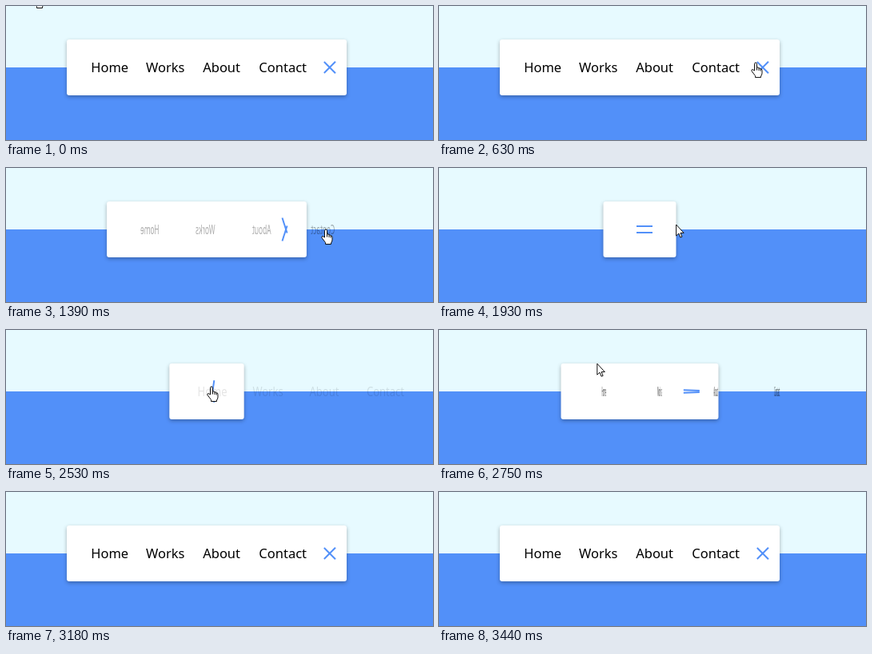
Animation of 534x168 px, one loop 3680 ms. Source, as an HTML page with a canvas:

```html
<!DOCTYPE html>
<html lang="en">
<head>
<meta charset="utf-8">
<title>Animated navigation</title>
<style>
html, body { margin: 0; width: 100%; height: 100%; overflow: hidden; }
canvas { display: block; }
</style>
</head>
<body>
<canvas id="stage" width="534" height="168"></canvas>
<script>
const ctx = document.getElementById('stage').getContext('2d');
const LOOP = 3680, MID = 251, CENTER_Y = 77, CLOSED = 91, OPEN = 350;
const BLUE = '#5290f9';
const items = [['Home', 53.7], ['Works', 123.2], ['About', 193.6], ['Contact', 270.2]];

// time, x, y of the pointer's hot spot
const pointerPath = [
  [0, 39, -16], [30, 39, -16], [460, 396, 71], [630, 396, 71], [750, 400, 77],
  [1730, 400, 77], [1930, 297, 71], [2060, 187, 72], [2190, 257, 71],
  [2600, 257, 71], [2950, 79, -15], [3010, 52, -14.5], [3100, 36, -34], [LOOP, 36, -34]
];
const handTimes = [[0, 30], [400, 1735], [2130, 2640]];
const hand = new Path2D('M-1.5 10V1.5Q-1.5 0 0 0T1.5 1.5V6Q3 5.2 4 7Q5.6 6 6.2 8Q8 7.4 8 9.5V13Q8 15 6.5 17V18.5H-.5V16.5L-5 10.5Q-5.5 8.5-3.8 8.5Z');
const fingers = new Path2D('M1.5 6V9.5M4 7V10M6.2 8V10.5');
const arrow = new Path2D('M.5 0V14L3.7 11 5.7 16 7.8 15.2 5.8 10.4H10Z');

const clamp = v => Math.min(1, Math.max(0, v));
const mix = (a, b, k) => a + (b - a) * k;
const ramp = (t, start, length) => clamp((t - start) / length);

// CSS "ease": cubic-bezier(.25, .1, .25, 1)
function ease(x) {
  let lo = 0, hi = 1, s = x;
  for (let i = 0; i < 20; i++) {
    s = (lo + hi) / 2;
    const bx = .75 * s * (1 - s) + s ** 3;
    if (bx < x) lo = s; else hi = s;
  }
  return .3 * s * (1 - s) ** 2 + 3 * s * s * (1 - s) + s ** 3;
}

function drawText(label, x, turn, alpha) {
  ctx.save();
  ctx.globalAlpha = alpha;
  ctx.translate(x, 83);
  ctx.scale(Math.cos(turn * 2 * Math.PI), 1);
  ctx.fillStyle = '#000';
  ctx.fillText(label, 0, 0);
  ctx.restore();
}

function drawLine(x, dir, p) {
  ctx.save();
  ctx.translate(x, CENTER_Y - 4 * dir);
  ctx.rotate(-dir * p * 765 * Math.PI / 180);
  ctx.translate(0, dir * 5.5 * p);
  ctx.fillStyle = BLUE;
  ctx.fillRect(-10, -1, 20, 2);
  ctx.restore();
}

function drawPointer(t) {
  const i = pointerPath.findIndex(k => k[0] > t);
  const [t0, x0, y0] = pointerPath[i - 1], [t1, x1, y1] = pointerPath[i];
  let k = (t - t0) / (t1 - t0);
  if (t1 === 460) k = k * k * (3 - 2 * k);
  if (t1 === 2950) k = k ** 1.3;
  const isHand = handTimes.some(([a, b]) => t >= a && t < b);
  ctx.save();
  ctx.translate(mix(x0, x1, k), mix(y0, y1, k));
  ctx.fillStyle = '#fff';
  ctx.strokeStyle = '#111';
  ctx.lineWidth = 1;
  ctx.lineJoin = 'round';
  const shape = isHand ? hand : arrow;
  ctx.fill(shape);
  ctx.stroke(shape);
  if (isHand) ctx.stroke(fingers);
  ctx.restore();
}

function draw(t) {
  const closing = t < 2400;
  const turn = closing ? 1 - ramp(t, 1150, 620) : ramp(t, 2466, 609);
  const grow = closing ? 1 - ramp(t, 1169, 574) : ramp(t, 2526, 550);
  const eased = closing ? 1 - ease(1 - turn) : ease(turn);
  const width = mix(CLOSED, OPEN, grow), left = MID - width / 2;

  ctx.fillStyle = '#e7faff';
  ctx.fillRect(0, 0, 534, CENTER_Y);
  ctx.fillStyle = BLUE;
  ctx.fillRect(0, CENTER_Y, 534, 91);

  ctx.save();
  ctx.shadowColor = 'rgba(0,0,0,.3)';
  ctx.shadowBlur = 5;
  ctx.shadowOffsetY = 2;
  ctx.fillStyle = '#fff';
  ctx.beginPath();
  ctx.roundRect(left, 42, width, 70, 3);
  ctx.fill();
  ctx.restore();

  ctx.font = '16.5px "Noto Sans", "Open Sans", sans-serif';
  ctx.textAlign = 'center';
  for (const [label, x] of items) drawText(label, left + x, eased, eased);

  const iconX = left + 51.5 + 1.056 * (width - CLOSED);
  drawLine(iconX, 1, turn);
  drawLine(iconX, -1, turn);
  drawPointer(t);
}

function frame() {
  draw(performance.now() % LOOP);
  requestAnimationFrame(frame);
}
frame();
</script>
</body>
</html>
```
